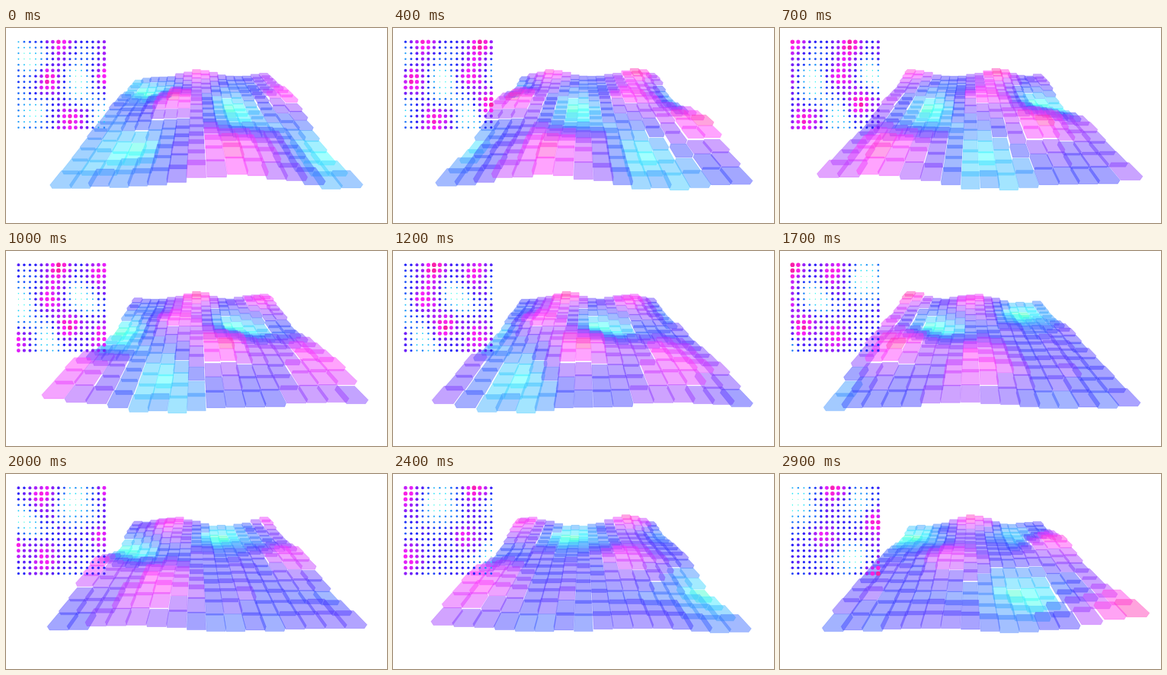
Animation of 500x256 px, one loop 3 s. Source, as an HTML page:

```html
<!DOCTYPE html>
<html lang="en">
<head>
<meta charset="utf-8">
<title>Scrolling noise terrain</title>
<style>
html, body { margin: 0; width: 100%; height: 100%; overflow: hidden; background: #fff; }
svg { display: block; width: 100vw; height: 100vh; }
</style>
</head>
<body>
<svg id="stage" viewBox="0 0 500 256" preserveAspectRatio="none"></svg>
<script>
const N = 16, STEP = 100, STEPS = 30;

// Centres of the main hills and dips: column, row
const HILLS = [[7.5, 0], [5, 7], [9.5, 13.7], [15, 6], [16.8, 0.5], [18.7, 11], [24.3, 2], [24.5, 13], [34.8, 8.8], [36.7, 0], [43.7, 6], [44, 15]];
const DIPS = [[2, 3], [3, 12.3], [10.5, 7], [15, 13.5], [20.7, 6], [29.5, 2.5], [39.5, 12], [41, 2.5]];

const clamp = (v, a, b) => Math.min(b, Math.max(a, v));

const bumps = (list, c, r) => list.reduce((sum, [x, y]) =>
  sum + Math.exp(-(((c - x) / 2.5) ** 2) - ((r - y) / 2.8) ** 2), 0);

function hash(x, y) {
  const s = Math.sin(x * 12.99 + y * 78.23) * 43758.5;
  return s - Math.floor(s) - 0.5;
}

function noise(x, y) {
  const i = Math.floor(x), j = Math.floor(y);
  const ease = t => t * t * (3 - 2 * t);
  const mix = (a, b, t) => a + (b - a) * t;
  const u = ease(x - i);
  const edge = k => mix(hash(i, k), hash(i + 1, k), u);
  return mix(edge(j), edge(j + 1), ease(y - j));
}

function height(c, r) {
  const detail = 0.2 * noise(c / 2.5, r / 2.5) + 0.1 * hash(c, r);
  return clamp(0.47 + 0.42 * bumps(HILLS, c, r) - 0.34 * bumps(DIPS, c, r) + detail, 0.05, 0.93);
}

// Camera: pitched down, x right, y up, z away from the viewer
const PITCH = 0.576, FOCAL = 249, DROP = 7.58, NEAR = 6.95;
const SIN = Math.sin(PITCH), COS = Math.cos(PITCH);

function project(x, y, z) {
  const g = NEAR + z, d = DROP - y;
  const s = FOCAL / (g * COS + d * SIN);
  return (250 + x * s).toFixed(1) + "," + (128 + (d * COS - g * SIN) * s).toFixed(1);
}

const HALF = 0.48, THICK = 0.27, RELIEF = 2.1;

// Outline of a flat box: three corners of its top, three of its bottom
function slab(col, row, v) {
  const x = col - 7, z = N - 1 - row;
  const out = x <= 0 ? -HALF : HALF;
  const top = (v - 0.5) * RELIEF + THICK / 2, low = top - THICK;
  return [
    [out, top, -HALF], [out, top, HALF], [-out, top, HALF],
    [-out, low, HALF], [-out, low, -HALF], [out, low, -HALF]
  ].map(([dx, y, dz]) => project(x + dx, y, z + dz)).join(" ");
}

const stage = document.getElementById("stage");

function add(tag, attrs) {
  const el = document.createElementNS("http://www.w3.org/2000/svg", tag);
  for (const k in attrs) el.setAttribute(k, attrs[k]);
  stage.appendChild(el);
  return el;
}

const cells = [];
// Far rows first, and outer columns before inner ones
const order = [...Array(N).keys()].sort((a, b) => Math.abs(b - 7) - Math.abs(a - 7));
for (let row = 0; row < N; row++) {
  for (const col of order) {
    const tile = add("polygon", {
      "fill-opacity": 0.45, "stroke-opacity": 0.4, "stroke-width": 0.6, "stroke-linejoin": "round"
    });
    cells.push({ col, row, tile });
  }
}
for (const cell of cells) {
  cell.dot = add("circle", { cx: 16.4 + cell.col * 7.5, cy: 18.2 + cell.row * 7.5 });
}

let shown = -1;

function draw(step) {
  if (step === shown) return;
  shown = step;
  for (const { col, row, tile, dot } of cells) {
    const v = height(col + step, row);
    const hue = (150 + 185 * v).toFixed(0);
    const color = `hsl(${hue},100%,60%)`;
    tile.setAttribute("points", slab(col, row, v));
    tile.setAttribute("fill", color);
    tile.setAttribute("stroke", color);
    dot.setAttribute("r", (0.3 + 2.8 * v).toFixed(2));
    dot.setAttribute("fill", `hsl(${hue},95%,55%)`);
  }
}

const start = performance.now();

function tick() {
  draw(Math.floor((performance.now() - start) / STEP) % STEPS);
  requestAnimationFrame(tick);
}
tick();
</script>
</body>
</html>
```
